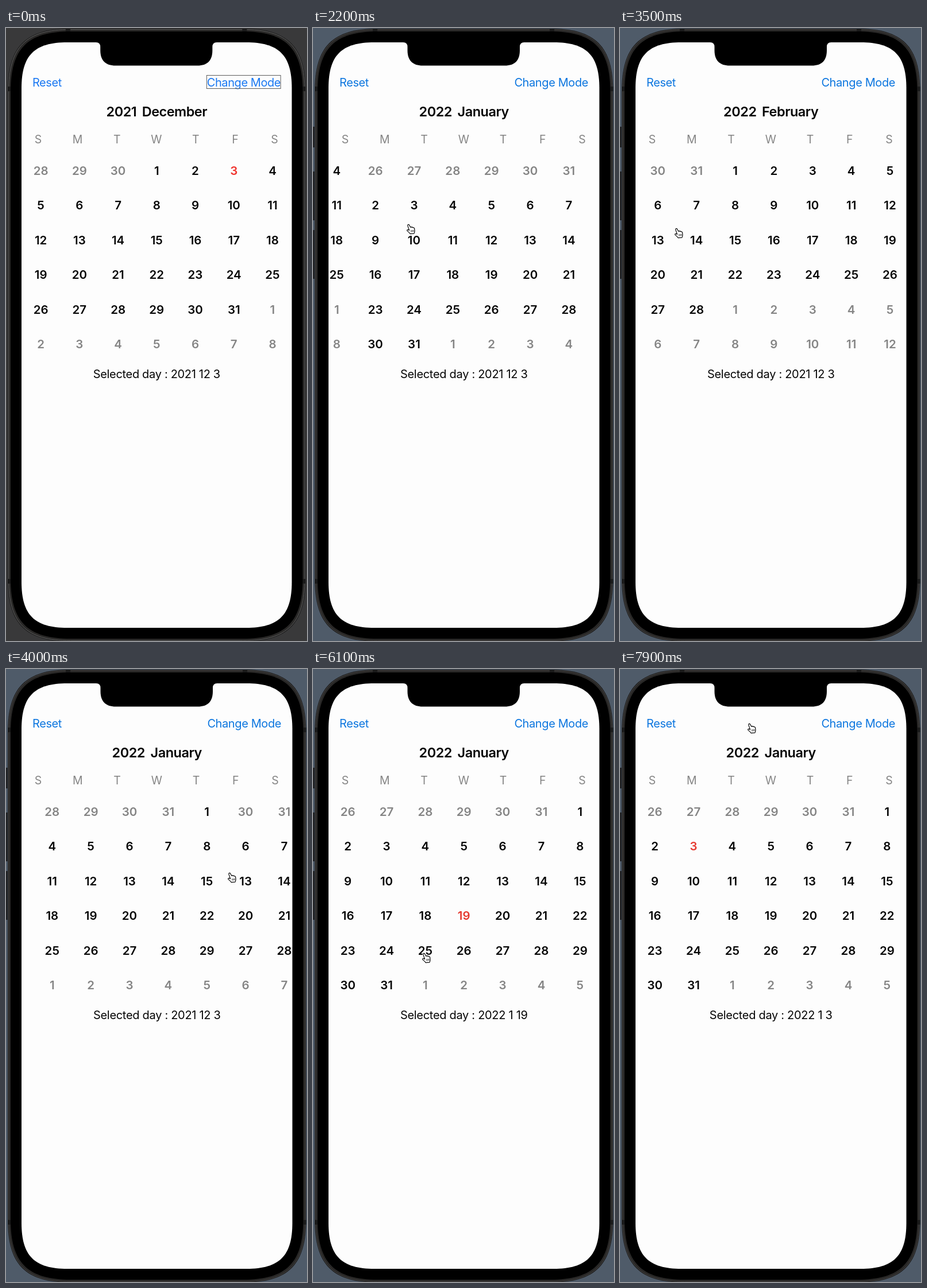
These frames come from a looping animation (524 px wide and 1068 px high, 8000 ms). An HTML page with a canvas:

```html
<!DOCTYPE html>
<html lang="en">
<head>
<meta charset="utf-8">
<title>Calendar paging</title>
<style>
html, body { margin: 0; width: 100%; height: 100%; overflow: hidden; background: #4f5b69; }
canvas { display: block; }
</style>
</head>
<body>
<canvas id="stage" width="524" height="1068"></canvas>
<script>
const ctx = document.getElementById('stage').getContext('2d');
const LOOP = 8000, STEP = 100;
const LEFT = 27, WIDTH = 471.5, MID = LEFT + WIDTH / 2;
const GRAY = '#858585', INK = '#050505';
const MONTHS = [[2021, 11, 'December'], [2022, 0, 'January'], [2022, 1, 'February']];

// Page slides: start, duration, direction
const SLIDES = [[1800, 750, 1], [2800, 900, 1], [3700, 800, -1]];

// Selected day over time: start, year, month, day
const PICKS = [[0, 2021, 12, 3], [5100, 2022, 1, 13], [5700, 2022, 1, 19],
               [6300, 2022, 1, 25], [7200, 2022, 1, 3]];

// Pointer path: time, x, y
const POINTER = [
  [900, 60, 120], [1400, 224, 208], [1800, 405, 340], [2100, 170, 350], [2300, 170, 350],
  [2600, 361, 343], [2800, 385, 342], [3200, 102, 357], [3700, 102, 357], [4100, 490, 365],
  [4500, 394, 371], [5000, 330, 376], [5200, 330, 376], [5600, 262, 440], [5800, 262, 440],
  [6100, 197, 503], [6500, 197, 503], [7100, 127, 318], [7300, 127, 318], [7900, 229, 103]
];

const hand = new Path2D('M-5.2-5.6C-5.4-7.8-3.3-8.4-2.4-6.8L-.3-2.8Q1.2-4 2.3-2.6Q3.8-3.5 4.6-2' +
  'Q6.3-2.4 6.6-.6L7 3.2Q7 6 5.8 8.2L-.8 8.6Q-2.2 6.4-5.8 3.6Q-7 1.6-5 1.3L-2.5 2.4Z');
const knuckles = new Path2D('M.6 2.2L1.1 5.6M2.7 2L3.1 5.4M4.7 1.8L5 5.1');

const notch = new Path2D('M157 24V25Q164.5 25 164.5 33V39C164.5 57 174 65.5 191 65.5H334' +
  'C351 65.5 360 57 360 39V33Q360 25 367.5 25V24Z');

// Rectangle with continuous corners reaching e along each side
function squircle(x, y, w, h, e) {
  const p = new Path2D(), c = e * 0.28, r = x + w, b = y + h;
  p.moveTo(x + e, y);
  p.lineTo(r - e, y);
  p.bezierCurveTo(r - c, y, r, y + c, r, y + e);
  p.lineTo(r, b - e);
  p.bezierCurveTo(r, b - c, r - c, b, r - e, b);
  p.lineTo(x + e, b);
  p.bezierCurveTo(x + c, b, x, b - c, x, b - e);
  p.lineTo(x, y + e);
  p.bezierCurveTo(x, y + c, x + c, y, x + e, y);
  p.closePath();
  return p;
}
const body = squircle(3, 1, 519.5, 1068, 110);
const rim = squircle(4.5, 2.5, 516.5, 1065, 108);
const bezel = squircle(8, 6, 509.5, 1058, 105);
const screen = squircle(LEFT, 25, WIDTH, 1020, 80);

function fill(color, shape) {
  ctx.fillStyle = color;
  ctx.fill(shape);
}

function setFont(weight, size, spacing) {
  ctx.font = `${weight} ${size}px Inter, sans-serif`;
  ctx.letterSpacing = spacing + 'px';
}

function text(str, x, y, color, align = 'center') {
  ctx.fillStyle = color;
  ctx.textAlign = align;
  ctx.fillText(str, x, y);
}

function pagePosition(t) {
  return SLIDES.reduce((pos, [start, length, dir]) => {
    const p = Math.min(1, Math.max(0, (t - start) / length));
    return pos + dir * (1 - (1 - p) ** 3);
  }, 0);
}

function drawPhone(dark) {
  ctx.fillStyle = '#1d1d1f';
  for (const [y, h] of [[172, 36], [250, 85], [352, 85]]) if (!dark) ctx.fillRect(0, y, 2.5, h);
  fill('#191919', body);
  fill('#292827', rim);
  ctx.strokeStyle = dark ? '#626262' : '#474544';
  ctx.lineWidth = 1;
  ctx.stroke(rim);
  ctx.fillStyle = '#1a1a1a';
  for (const x of [104, 412]) ctx.fillRect(x, 1, 8, 5);
  for (const y of [102, 960]) {
    ctx.fillRect(3, y, 5, 8);
    ctx.fillRect(517.5, y, 5, 8);
  }
  fill('#000', bezel);
  fill('#fdfdfd', screen);
  fill('#000', notch);
}

function drawHeader(month, blue, focused) {
  setFont(400, 20, -0.4);
  text('Reset', 46, 101.5, blue, 'left');
  text('Change Mode', 479, 101.5, blue, 'right');
  if (focused) {
    ctx.strokeStyle = '#5c5c5c';
    ctx.strokeRect(350, 82.5, 129, 23);
  }
  const [year, , name] = MONTHS[month];
  setFont(600, 23.5, -0.5);
  const gap = 9.5, yearWidth = ctx.measureText(year).width;
  const x = MID - (yearWidth + gap + ctx.measureText(name).width) / 2;
  text(year, x, 154, INK, 'left');
  text(name, x + yearWidth + gap, 154, INK, 'left');
  setFont(400, 19.5, 0);
  [...'SMTWTFS'].forEach((d, i) => text(d, 56 + i * 68.75, 201, GRAY));
}

function drawMonth(index, left, pick, red) {
  const [year, month] = MONTHS[index];
  const offset = new Date(year, month, 1).getDay();
  setFont(600, 20.5, 0);
  for (let i = 0; i < 42; i++) {
    const date = new Date(year, month, i - offset + 1), day = date.getDate();
    const inMonth = date.getMonth() === month;
    const picked = inMonth && pick[1] === year && pick[2] === month + 1 && pick[3] === day;
    text(day, left + (i % 7 + 0.5) * WIDTH / 7, 256 + Math.floor(i / 7) * 60.45,
      picked ? red : inMonth ? INK : GRAY);
  }
}

function drawPointer(t) {
  const i = POINTER.findIndex(k => k[0] >= t);
  if (t < POINTER[0][0] || i < 0) return;
  const b = POINTER[i], a = POINTER[Math.max(0, i - 1)];
  const p = b === a ? 0 : (t - a[0]) / (b[0] - a[0]);
  ctx.save();
  ctx.translate(a[1] + (b[1] - a[1]) * p, a[2] + (b[2] - a[2]) * p);
  ctx.lineJoin = 'round';
  ctx.lineWidth = 3;
  ctx.strokeStyle = '#fff';
  ctx.stroke(hand);
  fill('#fff', hand);
  ctx.lineWidth = 1.2;
  ctx.strokeStyle = '#000';
  ctx.stroke(hand);
  ctx.lineWidth = 0.8;
  ctx.stroke(knuckles);
  ctx.restore();
}

function draw(t) {
  const focused = t < 600;
  const pos = pagePosition(t);
  const pick = PICKS.filter(p => p[0] <= t).pop();
  ctx.fillStyle = focused ? '#39393a' : '#4f5b69';
  ctx.fillRect(0, 0, 524, 1068);
  ctx.save();
  if (focused) ctx.transform(0.998, 0, 0, 1, 0.05, 0);
  drawPhone(focused);
  drawHeader(Math.round(pos), focused ? '#1a78f2' : '#0c76df', focused);
  ctx.save();
  ctx.clip(screen);
  MONTHS.forEach((_, i) => {
    if (Math.abs(i - pos) < 1) drawMonth(i, LEFT + (i - pos) * WIDTH, pick, focused ? '#f0352f' : '#e63a30');
  });
  ctx.restore();
  setFont(400, 20, -0.3);
  text('Selected day : ' + pick.slice(1).join(' '), MID, 610, INK);
  ctx.restore();
  drawPointer(t);
}

function tick() {
  const t = performance.now() % LOOP;
  draw(Math.floor(t / STEP) * STEP);
  requestAnimationFrame(tick);
}
tick();
</script>
</body>
</html>
```
